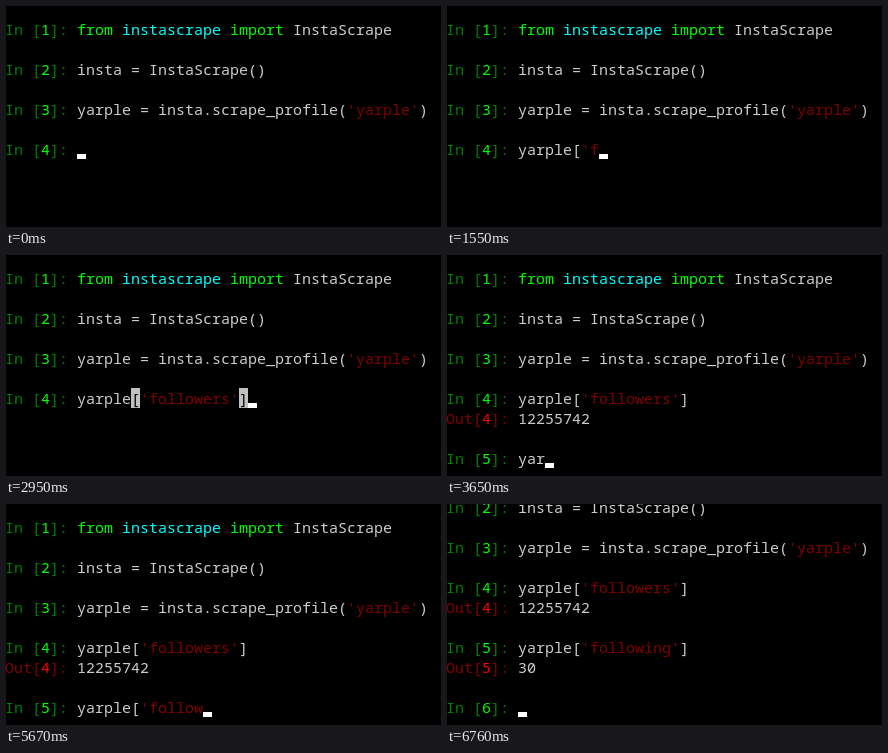
Animation of 435x221 px, one loop 7310 ms. Source, as an HTML page with a canvas:

```html
<!DOCTYPE html>
<html lang="en">
<head>
<meta charset="utf-8">
<title>Terminal session</title>
<style>
  html, body { margin: 0; width: 100%; height: 100%; overflow: hidden; background: #000; }
  canvas { display: block; }
</style>
</head>
<body>
<canvas id="stage" width="435" height="221"></canvas>
<script>
const ctx = document.getElementById('stage').getContext('2d');
const W = 435, H = 221, LOOP = 7310;
const CELL = 9, LINE = 20, LEFT = -1, TOP = 13, BASE = 16, CURSOR = 5;
const PROMPT = 8;
const GRAY = '#cccccc', MARK = '#c0c0c0', GREEN = '#008000', LIME = '#00ff00',
      RED = '#800000', BRIGHT = '#ff0000', CYAN = '#00ffff';

const PROFILE = 'yarple';
const FIRST = `${PROFILE}['followers']`;
const SECOND = `${PROFILE}['following']`;

// Moments at which each key is pressed, in ms
const FIRST_KEYS = [400, 510, 620, 730, 830, 940, 1090, 1320,
  1550, 1710, 1860, 2020, 2180, 2250, 2370, 2480, 2640, 2800, 2950];
const SECOND_KEYS = [3380, 3520, 3650, 3880, 4040, 4200,
  4500, 4730, 4960, 5040, 5190, 5350, 5500, 5670, 5770, 5870, 5970, 6290, 6460];
const FIRST_RUN = 3250, SECOND_RUN = 6760;

const typed = (text, keys, t) => text.slice(0, keys.filter(k => k <= t).length);
const colX = col => LEFT + col * CELL;
let scroll = 0;
const rowY = row => TOP + (row - scroll) * LINE;

function put(row, col, text, color) {
  ctx.fillStyle = color;
  ctx.fillText(text, colX(col), rowY(row) + BASE);
  return col + text.length;
}

function prompt(row, label, n, dark, light) {
  let col = put(row, 0, label, dark);
  col = put(row, col, String(n), light);
  put(row, col, ']:', dark);
}
const input = (row, n) => prompt(row, 'In [', n, GREEN, LIME);

function output(row, n, text) {
  prompt(row, 'Out[', n, RED, BRIGHT);
  put(row, PROMPT, text, GRAY);
}

// Quoted parts are red, even before the closing quote
function code(row, text) {
  let col = PROMPT;
  for (const part of text.match(/'[^']*'?|[^']+/g) || [])
    col = put(row, col, part, part[0] === "'" ? RED : GRAY);
  return col;
}

function markBracket(row, text, index) {
  ctx.fillStyle = MARK;
  ctx.fillRect(colX(PROMPT + index), rowY(row), CELL, LINE);
  put(row, PROMPT + index, text[index], '#000');
}

function cursor(row, col) {
  ctx.fillStyle = '#fff';
  ctx.fillRect(colX(col), rowY(row) + LINE - CURSOR, CELL, CURSOR);
}

function editLine(row, text) {
  const end = code(row, text);
  if (text.endsWith(']')) {
    markBracket(row, text, text.indexOf('['));
    markBracket(row, text, text.length - 1);
  }
  cursor(row, end);
}

function draw(t) {
  ctx.fillStyle = '#000';
  ctx.fillRect(0, 0, W, H);
  ctx.font = '500 15px "Noto Sans Mono", "DejaVu Sans Mono", monospace';
  scroll = t >= SECOND_RUN ? 3 : 0;

  input(0, 1);
  let col = put(0, PROMPT, 'from ', LIME);
  col = put(0, col, 'instascrape ', CYAN);
  col = put(0, col, 'import ', LIME);
  put(0, col, 'InstaScrape', GRAY);
  input(2, 2);
  code(2, 'insta = InstaScrape()');
  input(4, 3);
  code(4, `${PROFILE} = insta.scrape_profile('${PROFILE}')`);

  input(6, 4);
  if (t < FIRST_RUN) return editLine(6, typed(FIRST, FIRST_KEYS, t));
  code(6, FIRST);
  output(7, 4, '12255742');

  input(9, 5);
  if (t < SECOND_RUN) return editLine(9, typed(SECOND, SECOND_KEYS, t));
  code(9, SECOND);
  output(10, 5, '30');

  input(12, 6);
  cursor(12, PROMPT);
}

const start = performance.now();
function tick() {
  draw((performance.now() - start) % LOOP);
  requestAnimationFrame(tick);
}
tick();
</script>
</body>
</html>
```
